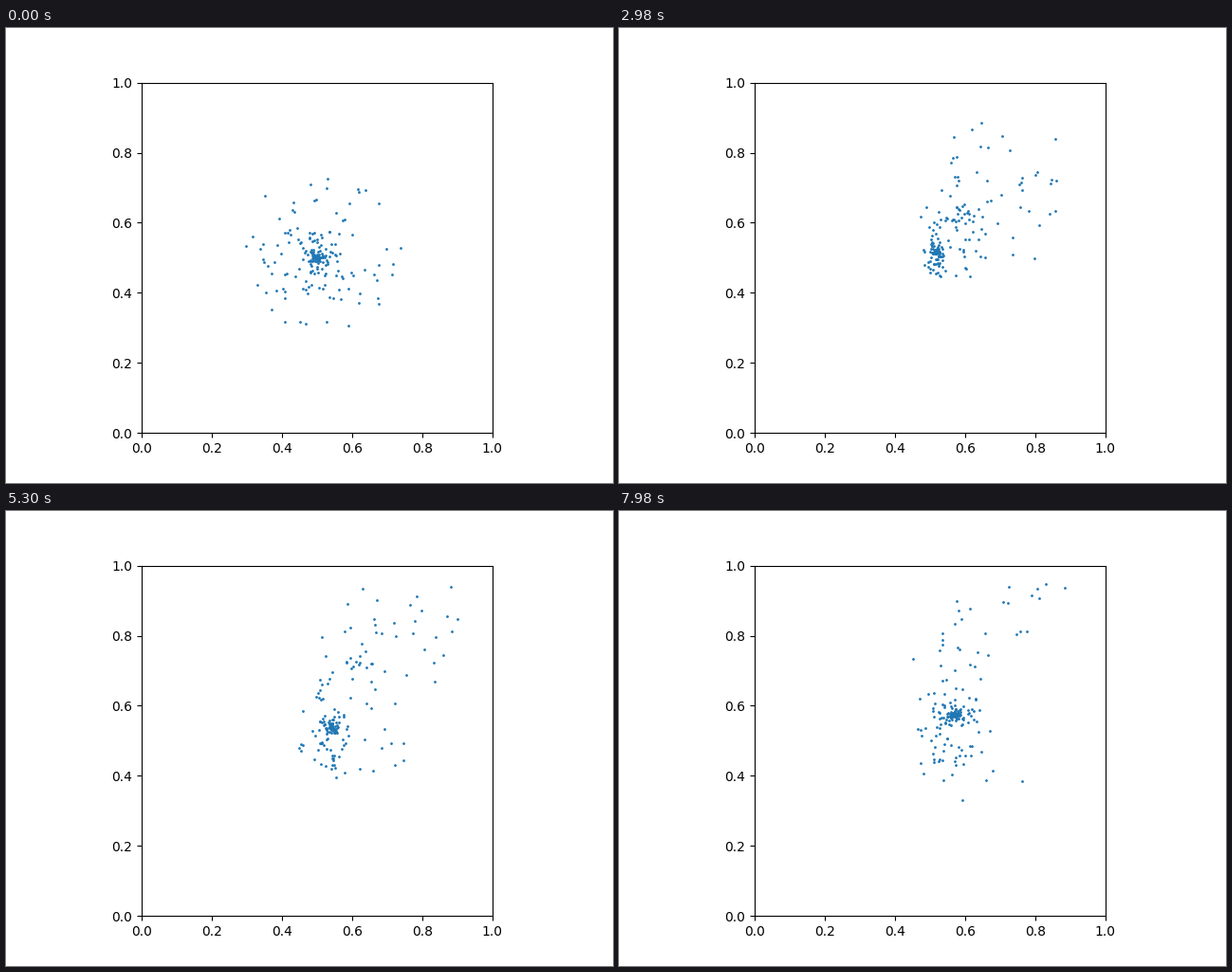
These frames come from a looping animation (640x480 px, 8000 ms). A matplotlib script:

```python
import numpy as np
import matplotlib.pyplot as plt
from matplotlib.animation import FuncAnimation

FRAMES, STEP = 400, 20
DT = STEP / 1000
STARS = 235
rng = np.random.default_rng(11)


def core(t):
    return 0.5 + 0.0045 * t + 0.00057 * t * t


def pull(pos, t):
    """Acceleration towards the slowly drifting core."""
    d = pos - core(t)
    r = np.hypot(d[:, 0], d[:, 1])[:, None]
    return -d / (r + 0.003) * (0.008 + 0.004 / (r + 0.01))


def start():
    # Radii crowd towards the centre and end at a sharp rim.
    u = (np.arange(STARS) + rng.random(STARS)) / STARS
    r = 0.24 * u[:, None] ** 2.6
    angle = rng.uniform(0, 2 * np.pi, STARS)
    d = r * np.column_stack([np.cos(angle), np.sin(angle)])
    share = r**2 / (r**2 + 0.03**2)
    drift = share * np.array([0.056, 0.051])
    spin = 0.035 * np.column_stack([-d[:, 1], d[:, 0]]) / (r + 0.01)
    noise = share * rng.normal(0, 0.014, d.shape)
    return 0.5 + d, 0.0045 + drift + spin + 0.05 * d + noise


def simulate():
    pos, vel = start()
    path = [pos]
    for i in range(1, FRAMES):
        vel = vel + pull(pos, (i - 1) * DT) * DT / 2
        pos = pos + vel * DT
        vel = vel + pull(pos, i * DT) * DT / 2
        path.append(pos)
    return path


path = simulate()

fig, ax = plt.subplots(figsize=(6.4, 4.8), dpi=100)
ax.set_aspect("equal")
ax.set_xlim(0, 1)
ax.set_ylim(0, 1)
stars, = ax.plot([], [], "o", color="#1f77b4", markersize=1)


def draw(i):
    stars.set_data(path[i][:, 0], path[i][:, 1])
    return stars,


anim = FuncAnimation(fig, draw, frames=FRAMES, interval=STEP,
                     repeat=True, repeat_delay=0, blit=False)
plt.show()
```
